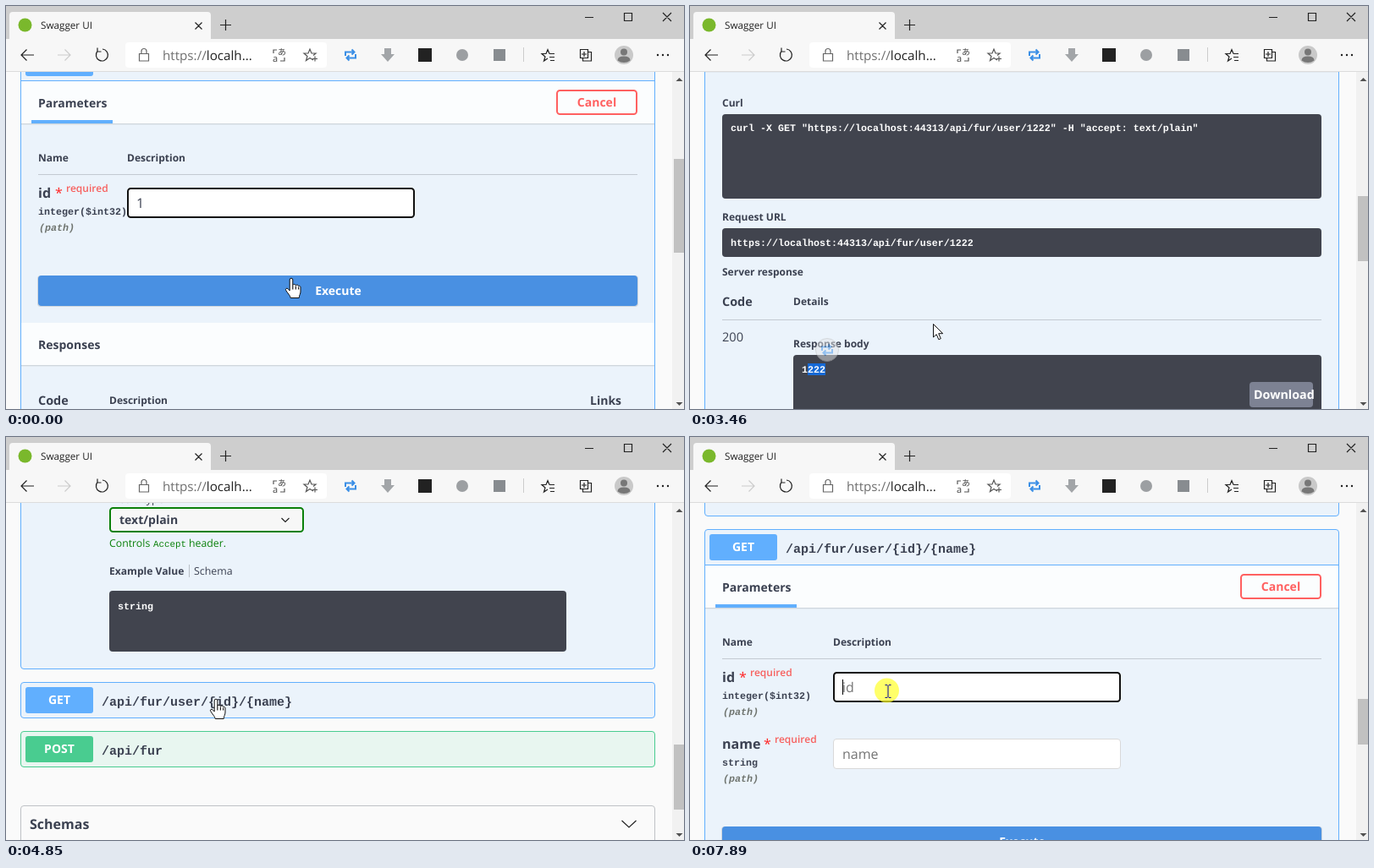
Recreate the animation shown at these times as an HTML page. Size 801 by 477 pixels, loop 8000 ms.

```html
<!DOCTYPE html>
<html lang="en">
<head>
<meta charset="utf-8">
<title>Swagger UI</title>
<style>
html, body { margin: 0; width: 100%; height: 100%; overflow: hidden; background: #fafafa; }
svg { display: block; width: 801px; height: 477px; }
text { font-family: "Open Sans", "Noto Sans", sans-serif; fill: #3b4151; white-space: pre; text-rendering: geometricPrecision; }
.b { font-weight: 700; }
.m { font-family: "Liberation Mono", monospace; font-weight: 700; }
.i { font-style: italic; }
.w { fill: #fff; }
.line { fill: none; stroke: #222; stroke-width: 1.2; }
#c-beam { mix-blend-mode: difference; }
</style>
</head>
<body>
<svg id="stage" viewBox="0 0 801 477"></svg>
<script>
const MONO = 11.667;
const BLUE = '#61affe', GREEN = '#49cc90', DARK = '#41444e';

// Drawing helpers: text is placed by the middle of its capitals.
const rect = (x, y, w, h, fill, more = '') =>
  `<rect x="${x}" y="${y}" width="${w}" height="${h}" fill="${fill}" ${more}/>`;
const text = (x, cy, s, size = 14, cls = 'b', more = '') =>
  `<text x="${x}" y="${cy + size * 0.355}" font-size="${size}" class="${cls}" ${more}>${s}</text>`;
const mid = (x, cy, s, cls = 'b', more = '') => text(x, cy, s, 14, cls, 'text-anchor="middle" ' + more);
const path = (d, more = '') => `<path class="line" d="${d}" ${more}/>`;
const group = (id, inner) => `<g id="${id}">${inner}</g>`;
const frame = (x, y, w, h, stroke, fill = 'none', width = 2) =>
  rect(x + width / 2, y + width / 2, w - width, h - width, fill, `rx="3.5" stroke="${stroke}" stroke-width="${width}"`);
const pre = (x, y, w, h) => rect(x, y, w, h, DARK, 'rx="4"');
const code = (x, cy, s) => text(x, cy, s, MONO, 'm w');
const rule = y => rect(38, y, 708, 1, '#c3cad2');
const band = y => rect(18, y, 748, 50, '#fbfdfe') + rect(18, y + 50, 748, 1, '#000', 'opacity=".12"') +
  rect(18, y + 51, 748, 1, '#000', 'opacity=".04"');

function block(y, h, color, tint, method, route) {
  return frame(17, y, 750, h, color, tint, 1) +
    rect(23, y + 6, 80, 31, color, 'rx="3"') +
    mid(63, y + 21.5, method, 'b w') +
    text(113, y + 23, route, 15, 'm');
}
const getBlock = (y, h, route) => block(y, h, BLUE, '#ebf3fb', 'GET', route);

function field(x, y, hint, fill) {
  return frame(x, y, 340, 36, '#d9d9d9', fill, 1) +
    text(x + 11, y + 18, hint, 16, '', 'style="fill:#757575"');
}

function param(y, name, type, starX) {
  return text(38, y, name, 16) +
    text(starX, y, '*', 16, '', 'style="fill:#f22"') +
    text(starX + 13, y - 5, 'required', 12, '', 'font-weight="600" style="fill:#f7615f"') +
    text(38, y + 22, type, MONO, 'm') +
    text(39, y + 41, '(path)', MONO, 'm i', 'style="fill:#6f746f"');
}

const params = (y, descX) =>
  rect(18, y + 42, 748, 1, BLUE) + band(y + 43) +
  text(38, y + 69, 'Parameters') + rect(30, y + 89, 96, 4, BLUE) +
  text(38, y + 133.5, 'Name', 12) + text(descX, y + 133.5, 'Description', 12) + rule(y + 153) +
  param(y + 175, 'id', 'integer($int32)', 58);

const cancel = y => frame(650, y, 96, 30, '#ff6060') + mid(698, y + 15, 'Cancel', 'b', 'style="fill:#ff6060"');
const execute = y => rect(37, y, 710, 37, '#000', 'rx="4" opacity=".12"') +
  rect(38, y, 708, 36, '#4990e2', 'rx="4"') + mid(392.5, y + 18, 'Execute', 'b w');
const columns = (y, second, links) => text(38, y, 'Code', 14.4) + text(122, y, second, 12) +
  (links ? text(690, y, 'Links') : '');

// The first operation, before and after the request.
const top1 = getBlock(46, 1314, '/api/fur/user/{id}') + params(46, 143) + cancel(99) +
  frame(143, 215, 340, 36, '#d9d9d9', '#fff', 1) +
  group('focus1', frame(143, 215, 340, 36, '#111')) +
  text(154, 233, '', 16, '', 'id="typed"');

const idle = execute(319) + band(375) + text(38, 401, 'Responses') + columns(467, 'Description', true);

const headers = ['content-encoding: gzip', 'content-type: text/plain; charset=utf-8',
  'date: Thu20 Aug 2020 01:43:02 GMT', 'server: Microsoft-IIS/10.0', 'status: 200',
  'vary: Accept-Encoding', 'x-powered-by: ASP.NET'];
const url = 'https://localhost:44313/api/fur/user/1222';

const live = frame(392, 329, 344, 30, '#808080') + rect(48, 329, 345, 30, '#4990e2', 'rx="4"') +
  rect(380, 329, 13, 30, '#4990e2') +
  mid(220, 344, 'Execute', 'b w') + mid(564, 344, 'Clear') +
  band(389) + text(38, 415, 'Responses') +
  text(38, 477, 'Curl', 12) + pre(38, 490, 708, 100) +
  code(48, 506, `curl -X GET "${url}" -H "accept: text/plain"`) +
  text(38, 612, 'Request URL', 12) + pre(38, 625, 708, 34) + code(48, 642, url) +
  text(38, 677, 'Server response', 12) + columns(711.5, 'Details') + rule(733) +
  text(38, 754, '200', 14.6, '') + text(122, 762, 'Response body', 12) +
  pre(122, 775, 624, 72) + rect(139, 785, 21, 14, '#1569d6', 'id="sel"') + code(132, 792, '1222') +
  rect(661, 807, 75, 30, '#7d8293', 'rx="4"') + text(666, 822, 'Download', 14.3, 'b w') +
  text(122, 865, 'Response headers', 12) + pre(122, 878, 624, 118) +
  headers.map((s, i) => code(139, 895 + 14 * i, s)).join('') +
  text(38, 1014.5, 'Responses', 12) + columns(1049, 'Description', true) + rule(1070) +
  text(38, 1091, '200', 14.6, '') + text(690, 1091, 'No links', 14.4, 'i') +
  text(122, 1108, 'Success', 16, '') + text(122, 1159, 'Media type', 12.5, '') +
  frame(122, 1168, 230, 30, '#0a800a', '#f7f7f7') + text(134, 1183, 'text/plain') +
  path('M325.500 1181l4.500 4.500 4.500-4.500', 'stroke-width="1.8"') +
  text(122, 1211, 'Controls', 12.3, '', 'style="fill:#0a800a"') +
  text(174, 1211, 'Accept', 10.8, 'm', 'style="fill:#0a800a;font-weight:400"') +
  text(216, 1211, 'header.', 12.3, '', 'style="fill:#0a800a"') +
  text(122, 1244, 'Example Value', 12.1) + rect(216, 1236, 1, 15, '#b9bfc6') + text(222, 1244, 'Schema', 12.4, '') +
  pre(122, 1267, 540, 72) + code(132, 1284.5, 'string');

// The second operation, closed, open and in try-out mode.
const closed = getBlock(1375, 43, '/api/fur/user/{id}/{name}') +
  block(1433, 43, GREEN, '#e8f6f0', 'POST', '/api/fur') +
  frame(17, 1521, 750, 60, '#bfc2c6', '#fafafa', 1) + text(28, 1543, 'Schemas', 16) +
  path('M727.500 1539l8.500 8 8.500-8', 'stroke-width="1.8"');
const open = getBlock(1375, 900, '/api/fur/user/{id}/{name}') + params(1375, 169) +
  param(1629, 'name', 'string', 87);
const fields = fill => field(169, 1544, 'id', fill) + field(169, 1623, 'name', fill);
const locked = frame(631, 1428, 115, 30, '#808080') + mid(688.500, 1443, 'Try it out') + fields('#f9fafa');
const trial = cancel(1428) + fields('#fff') + execute(1727) +
  group('focus2', frame(169, 1544, 340, 36, '#111') + rect(180, 1553, 1, 18, '#000'));

const swap = (x, y) => path(`M${x - 6} ${y + 1}v-4.500h10m-2.500-3l3 3-3 3M${x + 6} ${y - 1}v4.500h-10m2.500 3l-3-3 3-3`,
  'style="stroke:#3b8fe6;stroke-width:2"');

const chrome = rect(0, 0, 801, 39, '#cecece') + rect(0, 39, 801, 38, '#f7f7f7') + rect(0, 77, 801, 1, '#dcdcdc') +
  path('M4 40V11q0-4 4-4h230q4 0 4 4v29z', 'style="fill:#f7f7f7;stroke:none"') +
  '<circle cx="22.500" cy="22.500" r="8" fill="#7ab82c"/>' +
  text(41, 23, 'Swagger UI', 11.7, '', 'style="fill:#222"') +
  path('M223.500 19.500l8 8m0-8l-8 8M253 22.500h13m-6.500-6.500v13M684 13.500h10M730.500 8.500h9v9h-9zM776 8l10 10m0-10l-10 10') +
  path('M33 58H18m6.500-6.500L18 58l6.500 6.500', 'stroke-width="1.5"') +
  path('M61 58h15m-6.500-6.500L76 58l-6.500 6.500', 'style="stroke:#ccc"') +
  path('M108 53.500a7 7 0 1 0 6-2.500m-6-1.500v4.500h4.500', 'stroke-width="1.5"') +
  rect(141, 43, 238, 30, '#fff', 'rx="4"') +
  path('M157.500 56.500h11v8.500h-11zM160 56.500v-3a3 3 0 0 1 6 0v3', 'style="stroke:#666"') +
  `<text x="185" y="64" font-size="15.2" style="fill:#222"><tspan fill="#707070" style="fill:#707070">https://</tspan>localh...</text>` +
  `<text x="321" y="58" font-size="10" style="font-family:'Noto Sans CJK JP','Noto Sans CJK SC',sans-serif;fill:#444">あ</text>` +
  text(315, 62, 'a', 11, '', 'style="fill:#444"') +
  path('M316 56v-4h4M329 61v4h-5', 'style="stroke:#555"') +
  path('M363 64l-4-2.500-4.500 3 1.500-5-4-3.500h5l2-5 2 5h5l-3 2.500M362 62.500h6m-3-3v6', 'style="stroke:#555"') +
  swap(407, 58) +
  '<path d="M447 50h8v7h4l-8 9-8-9h4z" fill="#a2a5a8"/>' +
  rect(487, 50, 16, 16, '#222') + '<circle cx="539" cy="58" r="7" fill="#9c9fa2"/>' +
  rect(576, 51, 14, 14, '#888c90') + rect(611, 49, 1, 17, '#ccc') +
  path('M640 62l-4.500 3 1.500-5-4-3.500h5l2-5 2 5M642 56.500h6M642 60.500h6M643 64.500h5') +
  path('M678.500 51.500h9v10h-9zM688 54.500h3.500v10.500h-10v-3M683 54v6m-3-3h6') +
  '<circle cx="730" cy="58" r="11" fill="#c9c9c9"/><circle cx="730" cy="54.500" r="4" fill="#777"/>' +
  '<path d="M722.500 64.500q0-5 7.500-5t7.500 5q-7.500 5-15 0z" fill="#777"/>' +
  [770, 776, 782].map(x => `<circle cx="${x}" cy="58" r="1.200" fill="#222"/>`).join('');

const bar = rect(787, 78, 14, 399, '#f1f1f1') + rect(789, 0, 12, 0, '#c1c1c1', 'id="thumb"') +
  '<path d="M791.500 89l4-4 4 4zM791.500 469l4 4 4-4z" fill="#505050"/>';

const cursors =
  group('c-arrow', '<path d="M.5 .5V16l3.700-3.300 2.600 6 2.500-1-2.600-6h5z" fill="#fff" stroke="#111"/>') +
  group('c-hand', '<path d="M-1.800 15V2a1.800 1.800 0 0 1 3.600 0v6.500c.5-1.600 3.300-1.400 3.600 .3c.7-1.200 3-.9 3.200 .7c1-.7 2.400 0 2.400 1.500v5c0 3-1.600 4-1.800 7.500H-.8c-.2-2.800-3.600-5.400-5.600-9.200c-.8-1.600 1.200-2.800 2.500-1.600z" fill="#fff" stroke="#111"/>' +
    path('M1.800 8.500v5M5.400 9.500v4M8.600 10.500v3', 'stroke-width="1"')) +
  group('c-beam', path('M-3.500-7.500h2.500l1 1 1-1h2.500M-3.500 7.500h2.500l1-1 1 1h2.500M0-6.500v13', 'style="stroke:#fff;stroke-width:1"')) +
  group('c-stop', '<circle r="6.500" fill="#fff" stroke="#fff" stroke-width="4"/>' +
    path('M-4.600-4.600l9.200 9.200M6.500 0a6.500 6.500 0 1 1-13 0a6.500 6.500 0 1 1 13 0', 'style="stroke:#d8100c;stroke-width:2.200"'));

document.getElementById('stage').innerHTML =
  '<defs><clipPath id="view"><rect y="78" width="787" height="399"/></clipPath></defs>' +
  rect(0, 0, 801, 477, '#fafafa') +
  '<g clip-path="url(#view)">' +
  group('page', top1 + group('idle', idle) + group('live', live + group('closed', closed) +
    group('open', open + group('locked', locked) + group('trial', trial)))) + '</g>' +
  bar + chrome +
  group('popup', '<circle cx="162" cy="407" r="13.500" fill="#e4e7ea" stroke="#bbb"/>' + swap(162, 407)) +
  '<circle id="press" r="14.500" fill="#ff2" opacity=".68"/>' + cursors;

const el = id => document.getElementById(id);
const show = (id, on) => el(id).setAttribute('display', on ? 'inline' : 'none');

// Screen updates come in even ticks; all keys below are in ticks.
const LOOP = 8000, TICK = 76.67;
const scroll = [[12, 0], [18, 232], [22, 362], [44, 362], [50, 721], [58, 1085], [66, 1085], [73, 1255], [74, 1266]];
const fade = [[41, 0], [44, 0.5], [46, 0.6], [48, 0]];
const mouse = [
  [-1, 337, 322, 'hand'], [0, 337, 322, ''], [8, 337, 322, 'hand'], [10, 337, 322, 'arrow'],
  [14, 342, 310, 'beam'], [18, 348, 303, 'beam'], [20, 348, 303, 'beam'], [27, 202, 418, 'beam'],
  [28, 202, 418, 'beam'], [31, 165, 442, 'beam'], [33, 140, 430, 'beam'], [37, 140, 430, 'beam'],
  [38, 138, 430, 'beam'], [40, 152, 440, 'beam'], [41, 152, 440, 'beam'], [43, 235, 400, 'arrow'],
  [44, 287, 376, 'arrow'], [50, 310, 340, 'arrow'], [60, 268, 330, 'hand'], [62, 248, 310, 'hand'],
  [68, 248, 312, 'arrow'], [72, 247, 317, 'stop'], [73, 247, 317, 'stop'], [74, 237, 301, 'stop'],
  [76, 218, 290, 'stop'], [78, 222, 278, 'stop'], [80, 230, 288, 'stop'], [82, 230, 288, 'stop'],
  [84, 392, 298, 'stop'], [85, 392, 298, ''], [87, 770, 193, 'arrow'], [88, 728, 185, 'hand'],
  [90, 689, 175, 'hand'], [94, 689, 175, 'hand'], [95, 600, 205, 'arrow'], [98, 300, 285, 'beam'],
  [100, 234, 301, 'beam']
];
const presses = [[8, 9], [38, 41], [63, 64], [92, 92], [101, 102]];

// Values between two keys are blended; words hold until the next key.
function at(keys, k) {
  let i = 0;
  while (i < keys.length - 1 && keys[i + 1][0] <= k) i++;
  const a = keys[i], b = keys[i + 1] || a;
  const p = b === a ? 0 : Math.max(0, (k - a[0]) / (b[0] - a[0]));
  return a.slice(1).map((v, j) => typeof v === 'string' ? v : v + (b[j + 1] - v) * p);
}

function draw(t) {
  const k = t < 70 ? -1 : Math.floor((t - 70) / TICK + 0.4);
  const [s] = at(scroll, k), [x, y, kind] = at(mouse, k);
  const isLive = k >= 10, isOpen = k >= 65, isTrial = k >= 93;

  el('typed').textContent = '1' + '2'.repeat([70, 300, 530].filter(m => t >= m).length);
  el('page').setAttribute('transform', `translate(0 ${-Math.round(s)})`);
  show('focus1', k < 9);
  show('idle', !isLive);
  show('live', isLive);
  show('closed', !isOpen);
  show('open', isOpen);
  show('locked', !isTrial);
  show('trial', isTrial);
  show('focus2', k >= 102);
  show('sel', k >= 39);
  el('sel').setAttribute('width', k < 40 ? 7 : 21);
  el('popup').setAttribute('opacity', at(fade, k)[0]);

  const total = isTrial ? 2674 : isOpen ? 2631 : isLive ? 1891 : 1312;
  el('thumb').setAttribute('y', Math.round(95 + (309 + s) * 365 / total));
  el('thumb').setAttribute('height', Math.round(399 * 365 / total));

  const place = `translate(${Math.round(x)} ${Math.round(y)})`;
  for (const c of ['arrow', 'hand', 'beam', 'stop']) {
    show('c-' + c, c === kind);
    el('c-' + c).setAttribute('transform', place);
  }
  show('press', presses.some(([a, b]) => k >= a && k <= b));
  el('press').setAttribute('cx', x - 1.5);
  el('press').setAttribute('cy', y - 1);
}

const start = performance.now();
function loop() {
  draw((performance.now() - start) % LOOP);
  requestAnimationFrame(loop);
}
loop();
</script>
</body>
</html>
```
